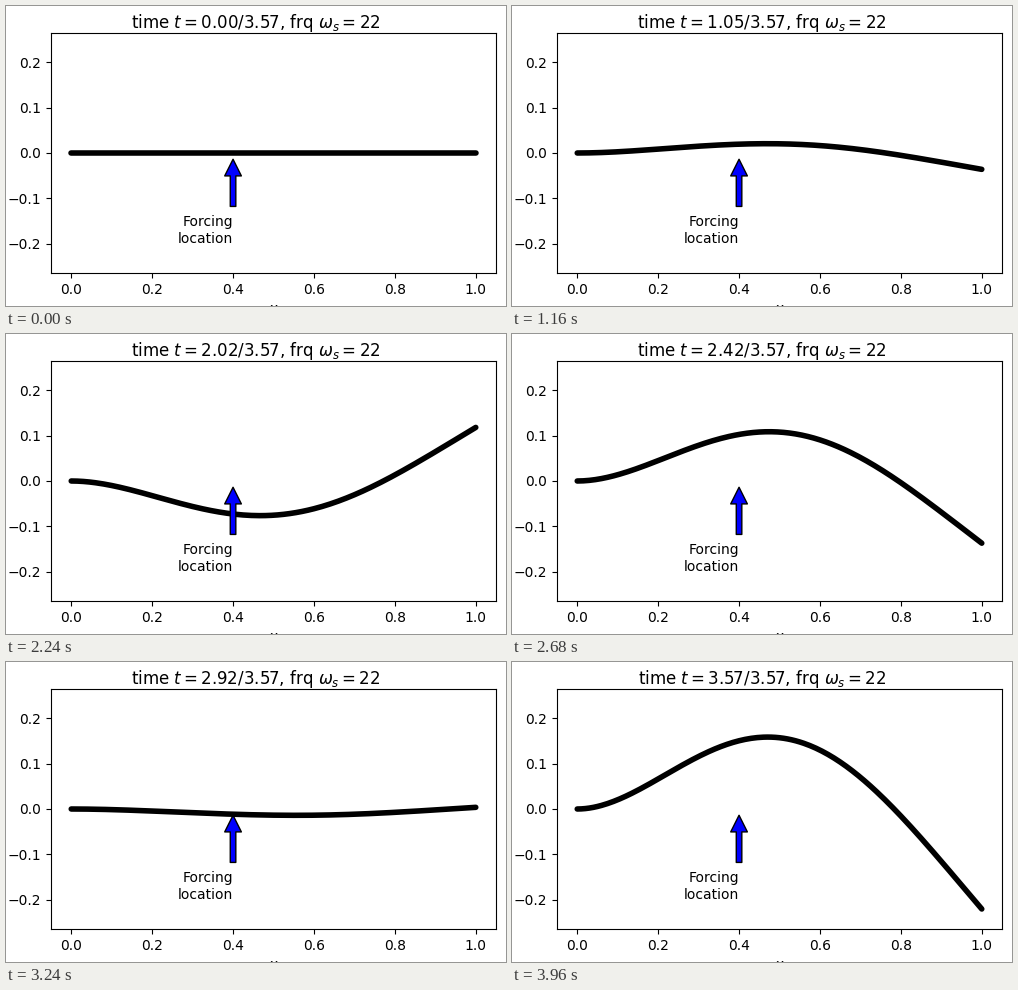
These frames come from a looping animation (500 px wide and 300 px high, 4000 ms). A matplotlib script:

```python
import numpy as np
import matplotlib.pyplot as plt
from matplotlib.animation import FuncAnimation

FRAMES = 100
OMEGA = 22                            # forcing frequency
X0 = 0.4                              # forcing location
T_END = 12.5 * 2 * np.pi / OMEGA
ROOTS = [1.8751041, 4.6940911, 7.8547574, 10.9955407, 14.1371684]


def mode(b, x):
    """Normalised bending mode of a beam clamped at 0 and free at 1."""
    s = (np.cosh(b) + np.cos(b)) / (np.sinh(b) + np.sin(b))
    return np.cosh(b * x) - np.cos(b * x) - s * (np.sinh(b * x) - np.sin(b * x))


def response(b, t):
    """Modal amplitude under a point force sin(OMEGA t), starting at rest."""
    w = b ** 2
    wave = np.sin(OMEGA * t) - OMEGA / w * np.sin(w * t)
    return mode(b, X0) * wave / (w ** 2 - OMEGA ** 2)


x = np.linspace(0, 1, 201)
times = np.linspace(0, T_END, FRAMES)
u = sum(np.outer(response(b, times), mode(b, x)) for b in ROOTS)
y_max = 1.2 * np.abs(u).max()

fig, ax = plt.subplots(figsize=(5, 3), dpi=100)
fig.subplots_adjust(left=0.09, right=0.98, bottom=0.11, top=0.91)
line, = ax.plot(x, u[0], color="black", lw=4, solid_capstyle="round")
ax.set_xlim(-0.05, 1.05)
ax.set_ylim(-y_max, y_max)
ax.set_xlabel("x")
ax.annotate("Forcing\nlocation", xy=(X0, 0), xytext=(X0, -0.138),
            ha="right", va="top",
            arrowprops=dict(facecolor="blue", shrink=0.1))
title = fig.suptitle("")


def update(i):
    line.set_ydata(u[i])
    title.set_text(rf"time $t={times[i]:.2f}/{T_END:.2f}$, "
                   rf"frq $\omega_s={OMEGA}$")
    return line, title


anim = FuncAnimation(fig, update, frames=FRAMES, interval=40,
                     repeat=True, repeat_delay=0)
plt.show()
```
